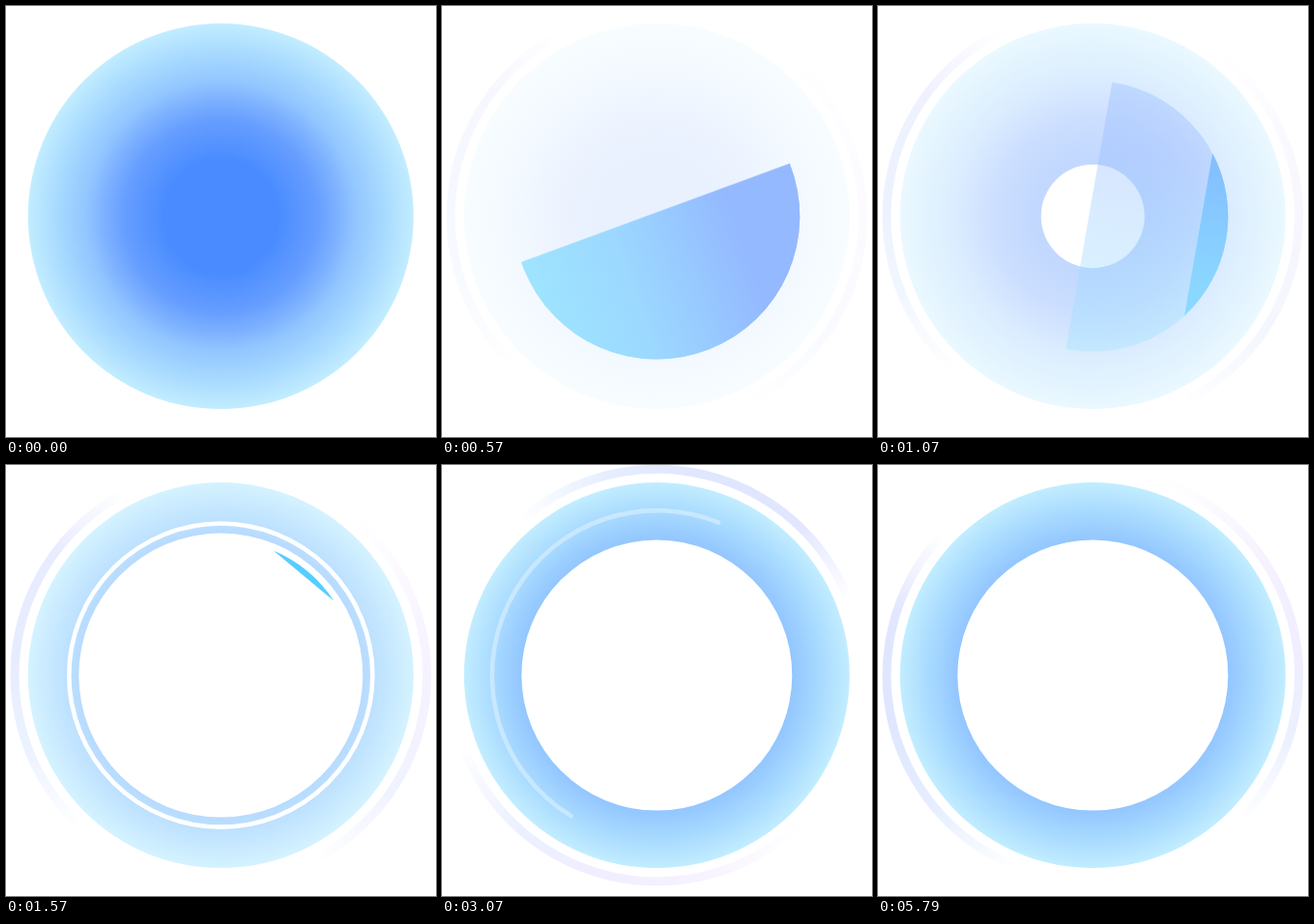
Write an HTML page with a canvas that moves like this. It is 445 px wide and 446 px high and loops after 6000 ms.

```html
<!DOCTYPE html>
<html lang="en">
<head>
<meta charset="utf-8">
<style>
html, body { margin: 0; width: 100%; height: 100%; overflow: hidden; background: #fff; }
canvas { display: block; }
</style>
</head>
<body>
<canvas id="stage" width="445" height="446"></canvas>
<script>
const ctx = document.getElementById('stage').getContext('2d');
const LOOP = 6000, FPS = 14, TAU = Math.PI * 2;
const rad = deg => deg * Math.PI / 180;
const clamp = v => Math.min(1, Math.max(0, v));
const span = (t, from, to) => clamp((t - from) / (to - from));
const mix = (a, b, p) => a + (b - a) * p;

function withStops(gradient, stops) {
  for (const [at, color] of stops) gradient.addColorStop(at, color);
  return gradient;
}

const discFill = withStops(ctx.createRadialGradient(0, 0, 0, 0, 0, 199.5), [
  [0.3, '#4a8cff'], [0.5, '#669eff'], [0.62, '#80b4ff'],
  [0.7, '#92c6ff'], [0.85, '#a8daff'], [1, '#c2edff']
]);

// Runs along the chord of the liquid
const liquidFill = withStops(ctx.createLinearGradient(0, 147, 0, -147), [
  [0, '#9ee4ff'], [0.33, '#9cd8ff'], [0.53, '#98caff'], [0.75, '#94b9ff']
]);

// Two soft arcs opposite each other, strongest at 0 and 180 degrees
const orbitFill = withStops(ctx.createConicGradient(0, 0, 0), [
  [0, '#dfe6ff'], [30 / 360, '#e2e6ff'], [55 / 360, '#fff'],
  [123 / 360, '#fff'], [160 / 360, '#f6f1ff'], [0.5, '#f1eeff'],
  [208 / 360, '#ebf0ff'], [237 / 360, '#fff'],
  [305 / 360, '#fff'], [333 / 360, '#e5eeff'], [1, '#dfe6ff']
]);

function circle(r, fill, alpha = 1) {
  ctx.globalAlpha = alpha;
  ctx.fillStyle = fill;
  ctx.beginPath();
  ctx.arc(0, 0, r, 0, TAU);
  ctx.fill();
}

function ring(r, width, stroke, alpha, from = 0, to = 360) {
  if (to <= from) return;
  ctx.globalAlpha = alpha;
  ctx.strokeStyle = stroke;
  ctx.lineWidth = width;
  ctx.beginPath();
  ctx.arc(0, 0, r, rad(from), rad(to));
  ctx.stroke();
}

// Part of a disc beyond a chord at distance d from the centre
function segment(r, d, fill, alpha) {
  if (alpha <= 0) return;
  const half = Math.acos(d / r);
  ctx.globalAlpha = alpha;
  ctx.fillStyle = fill;
  ctx.beginPath();
  ctx.arc(0, 0, r, -half, half);
  ctx.fill();
}

function orbit(t) {
  ctx.save();
  ctx.rotate(rad(187 + 0.09 * Math.max(0, t - 2000)));
  ring(213.3, 9, orbitFill, span(t, 0, 2000));
  ctx.restore();
}

function hole(t) {
  const r = t < 1570 ? 147 * span(t, 945, 1292) : mix(147, 140, span(t, 1570, 2000));
  if (r > 0) circle(r, '#fff');
}

function liquid(t) {
  if (t > 1800) return;
  const r = mix(148, 140, span(t, 570, 1070));
  const d = 140 - 144 * Math.exp(-0.0032 * Math.max(0, t - 570));
  const fade = span(t, 0, 570) * (1 - span(t, 1570, 1800));
  ctx.save();
  ctx.rotate(rad(70 - 0.12 * (t - 570)));
  if (t > 570) segment(r, -4, liquidFill, 0.76 * (1 - span(t, 570, 1570)));
  segment(r, d, liquidFill, fade);
  segment(r, d, '#55cfff', fade * span(t, 570, 1570) ** 2);
  ctx.restore();
}

function track(t) {
  if (t < 1270) return;
  if (t < 2000) {
    const r = Math.min(170.5, 157 + (t - 1570) * 0.0315);
    ring(r, 4.6, '#fff', mix(1, 0.36, span(t, 1570, 2000)));
    return;
  }
  // The line runs counter-clockwise from -68 to -403 degrees
  let head = 1, tail = 0;
  if (t < 2800) tail = span(t, 2214, 2800);
  else if (t < 3333) head = span(t, 2800, 3333);
  else tail = 1 - (1 - span(t, 3333, 4667)) ** 1.6;
  ring(170.5, 4.6, '#fff', 0.36, -68 - 335 * head, -68 - 335 * tail);
}

function draw(t) {
  ctx.setTransform(1, 0, 0, 1, 0, 0);
  ctx.globalAlpha = 1;
  ctx.clearRect(0, 0, 445, 446);
  ctx.translate(222.3, 217.6);
  ctx.lineCap = 'round';
  orbit(t);
  circle(199.5, discFill, Math.max(1 - t / 650, span(t, 600, 2000)));
  track(t);
  hole(t);
  liquid(t);
}

// 14 steps a second, with longer holds at 2 s and in the last stretch
function stepTime(ms) {
  let n = Math.floor(ms * FPS / 1000 + 0.1) % (LOOP * FPS / 1000);
  if (n > 28 && n < 31) n = 28;
  if (n >= 66) n -= n % 3;
  return n * 1000 / FPS;
}

const start = performance.now();
function tick() {
  draw(stepTime((performance.now() - start) % LOOP));
  requestAnimationFrame(tick);
}
tick();
</script>
</body>
</html>
```
